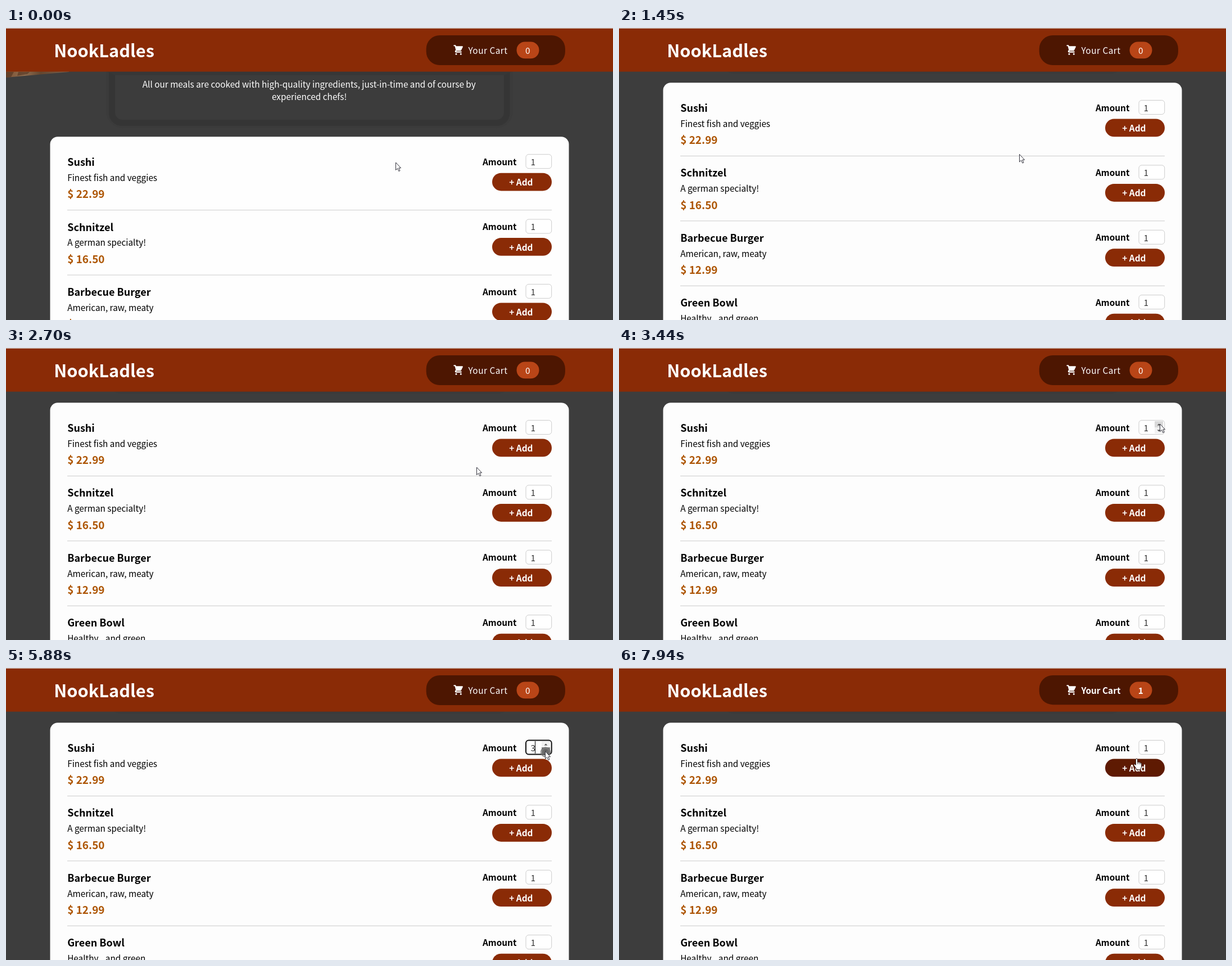
Animation of 1080x519 px, one loop 8 s. Source, as an HTML page:

```html
<!DOCTYPE html>
<html lang="en">
<head>
<meta charset="utf-8">
<title>NookLadles</title>
<style>
  html, body { margin: 0; width: 100%; height: 100%; overflow: hidden; background: #3d3d3d; }
  svg { display: block; width: 100%; height: 100%; }
  text { font: 400 15.32px "Noto Sans CJK JP", "Noto Sans CJK SC", "Noto Sans CJK", "Noto Sans JP", sans-serif; white-space: pre; }
  .title { font-size: 30.77px; font-weight: 700; fill: #fff; }
  .name { font-size: 18px; font-weight: 700; }
  .price { font-size: 18.95px; font-weight: 700; fill: #ad5502; }
  .label { font-size: 15.385px; font-weight: 700; }
  .value { font-weight: 300; fill: #333; }
  .light { fill: #fff; }
  .bold { font-size: 15.385px; font-weight: 700; fill: #fff; }
  .medium { font-size: 15.385px; font-weight: 500; fill: #fff; letter-spacing: .5px; }
  .mid { text-anchor: middle; }
</style>
</head>
<body>
<svg viewBox="0 0 1080 519" preserveAspectRatio="none">
  <defs>
    <linearGradient id="wood">
      <stop offset="0" stop-color="#7d5335"/>
      <stop offset=".3" stop-color="#8f6d50"/>
      <stop offset=".55" stop-color="#64462f"/>
      <stop offset="1" stop-color="#7d6350"/>
    </linearGradient>
  </defs>
  <rect width="1080" height="519" fill="#3d3d3d"/>
  <g id="page">
    <g transform="translate(0 -96.15)">
      <path d="M0 60H112V78L0 88Z" fill="url(#wood)"/>
      <path d="M0 78h14l-5 9-9 1zM22 78h20l-4 4-18 3z" fill="#50311f" opacity=".6"/>
      <rect x="178" y="-60" width="724" height="238" rx="30" fill="#3b3b3b"/>
      <rect x="183" y="-60" width="713.5" height="234" rx="23" fill="#353535"/>
      <rect x="194" y="-40" width="692" height="203" rx="13" fill="#3c3c3c"/>
      <path d="M176 76H904Q896 79 886 84H194Q184 79 176 76Z" fill="#373737"/>
      <text class="light mid" x="539.3" y="105.7">All our meals are cooked with high-quality ingredients, just-in-time and of course by</text>
      <text class="light mid" x="539.7" y="127.7">experienced chefs!</text>
    </g>
    <rect id="card" x="78.5" y="97.2" width="923" height="700" rx="13.5"/>
    <g id="list"></g>
  </g>
  <rect width="1080" height="77.6" fill="#8a2b06"/>
  <rect width="1080" height="1" fill="#cfc4bf"/>
  <text class="title" x="85.2" y="52">NookLadles</text>
  <rect id="cart" x="747.7" y="13" width="247.2" height="53" rx="24" fill="#4d1601"/>
  <path transform="translate(794.2 29.1) scale(1.04)" fill="#fff" d="M3 1a1 1 0 000 2h1.22l.305 1.222a.997.997 0 00.01.042l1.358 5.43-.893.892C3.74 11.846 4.632 14 6.414 14H15a1 1 0 000-2H6.414l1-1H14a1 1 0 00.894-.553l3-6A1 1 0 0017 3H6.28l-.31-1.243A1 1 0 005 1H3zM16 16.5a1.5 1.5 0 11-3 0 1.5 1.5 0 013 0zM6.5 18a1.5 1.5 0 100-3 1.5 1.5 0 000 3z"/>
  <text id="cartLabel" x="822.4">Your Cart</text>
  <rect x="908.5" y="24.5" width="40" height="29.8" rx="14.9" fill="#b94517"/>
  <text id="badge" x="928.4">0</text>
  <g id="ring">
    <circle r="8.5" fill="#777" fill-opacity=".5" stroke="#666" stroke-width="1"/>
    <circle r="6" fill="#555" fill-opacity=".45"/>
  </g>
  <g id="arrow">
    <path d="M.5 1V14.5L3.6 11.6 5.9 16.6 8 15.6 5.8 10.8H9.6Z" fill="#fff" stroke="#33333d" stroke-width="1" stroke-linejoin="round"/>
  </g>
  <g id="hand">
    <path d="M-1.6 1.6Q0-.8 1.6 1.6V7Q3.2 5.8 4.2 7.4 5.8 6.4 6.6 8 8.6 7.6 8.7 9.6V14Q8.4 17 7 18.5V20.3H-.5V18.6L-5 12.2Q-5.2 10-3.2 10.4L-1.6 12Z" fill="#fff" stroke="#2b1a16" stroke-width="1" stroke-linejoin="round"/>
    <path d="M1.6 7v3.4M4.2 7.6v3M6.6 8.2v2.6" stroke="#2b1a16" stroke-width=".8"/>
  </g>
</svg>
<script>
const LOOP = 8000, PITCH = 115.385, SCROLL = 96.15;
const $ = id => document.getElementById(id);
const set = (el, attrs) => { for (const k in attrs) el.setAttribute(k, attrs[k]); };
const show = (el, on) => set(el, { visibility: on ? 'visible' : 'hidden' });

const meals = [
  ['Sushi', 'Finest fish and veggies', '22.99'],
  ['Schnitzel', 'A german specialty!', '16.50'],
  ['Barbecue Burger', 'American, raw, meaty', '12.99'],
  ['Green Bowl', 'Healthy...and green...', '18.99']
];

$('list').innerHTML = meals.map(([name, info, price], i) => `
  <g transform="translate(0 ${i * PITCH})">
    <text class="name" x="109.2" y="149.1">${name}</text>
    <text x="109.2" y="175.8">${info}</text>
    <text class="price" x="109.2" y="206.3">$ ${price}</text>
    <rect x="109" y="227" width="862" height="1" fill="#ccc"/>
    <text class="label" x="848" y="147.6">Amount</text>
    <rect class="field" x="925" y="128.5" width="45.7" height="25" rx="5" fill="#fff" stroke="#ccc"/>
    ${i ? '' : `<g id="spinner">
      <rect id="up" x="953" y="130" width="15" height="11"/>
      <rect id="down" x="953" y="141" width="15" height="11"/>
      <path d="M957.5 137.5l3-3 3 3zM957.5 145.5l3 3 3-3z" fill="#505050"/>
    </g>
    <rect id="caret" x="941" y="130" width="1" height="22"/>`}
    <text class="value" x="933.4" y="147.8">1</text>
    <rect class="add" x="865" y="161.5" width="106" height="31.8" rx="15.9" fill="#8a2b06"/>
    <text class="bold" x="895.3" y="184">+ Add</text>
  </g>`).join('');

const field = document.querySelector('.field');
const value = document.querySelector('.value');
const addButton = document.querySelector('.add');

// spin: n = visible, u/d = hovered half, U/D = pressed half
const start = { x: 693, y: 238, scroll: SCROLL, amount: 1, spin: '', hover: 0, focus: 0, caret: 0, ring: 0, count: 0 };

// Each step: time, pointer x, pointer y, changed state
const steps = [
  [150, 702, 231],
  [380, 712, 223.5],
  [1450, 712, 223.5, { scroll: 0 }],
  [1570, 720, 219],
  [1770, 829, 188],
  [1910, 856, 182],
  [2060, 857, 182],
  [2220, 854, 187],
  [2340, 848, 196],
  [2460, 842, 204],
  [2580, 839, 209],
  [2700, 837, 211],
  [2820, 893, 176, { hover: 1 }],
  [2940, 938, 162],
  [3060, 948, 161],
  [3180, 953, 144, { hover: 0, spin: 'd' }],
  [3300, 957, 136, { spin: 'u' }],
  [3440, 962, 134],
  [3560, 965, 133],
  [4120, 965, 133, { focus: 1, caret: 1, amount: 2 }],
  [4410, 965, 133, { amount: 3, spin: 'U' }],
  [4560, 965, 133, { spin: 'u' }],
  [4810, 965, 133, { amount: 4, spin: 'U', ring: 1 }],
  [4960, 965, 133, { spin: 'u', ring: 0 }],
  [5390, 965, 133, { caret: 0 }],
  [5640, 962, 141, { spin: 'd' }],
  [5760, 959, 147],
  [5880, 959, 147, { amount: 3, caret: 1, spin: 'D', ring: 1 }],
  [6000, 959, 147, { spin: 'd', ring: 0 }],
  [6140, 959, 147, { amount: 2, spin: 'D', ring: 1 }],
  [6260, 959, 147, { spin: 'd', ring: 0 }],
  [6510, 959, 147, { amount: 1 }],
  [6630, 954, 161, { spin: 'n', hover: 1 }],
  [6750, 947, 167],
  [6870, 942, 172],
  [7010, 938, 173, { caret: 0 }],
  [7130, 935, 173],
  [7250, 933, 173],
  [7530, 933, 173, { caret: 1 }],
  [7820, 921, 160.5, { focus: 0, caret: 0, spin: '', count: 1 }]
];

function stateAt(t) {
  const s = { ...start };
  for (const [at, x, y, change] of steps) {
    if (at > t) break;
    Object.assign(s, { x, y }, change);
  }
  return s;
}

const shade = (spin, key) => spin === key ? '#d9d9d9' : spin === key.toUpperCase() ? '#858585' : '#f2f2f2';

function draw(t) {
  const s = stateAt(t);
  set($('page'), { transform: `translate(0 ${s.scroll})` });
  set($('card'), { fill: s.scroll ? '#fefefe' : '#fdfdfd' });

  set(field, { stroke: s.focus ? '#101010' : '#ccc', 'stroke-width': s.focus ? 2 : 1 });
  value.textContent = s.amount;
  show($('caret'), s.caret);
  show($('spinner'), s.spin);
  set($('up'), { fill: shade(s.spin, 'u') });
  set($('down'), { fill: shade(s.spin, 'd') });
  set(addButton, { fill: s.hover ? '#5e1a02' : '#8a2b06' });

  const place = { transform: `translate(${s.x} ${s.y})` };
  set($('arrow'), place);
  set($('hand'), place);
  set($('ring'), { transform: `translate(${s.x + 1} ${s.y + 2.5})` });
  show($('arrow'), !s.hover);
  show($('hand'), s.hover);
  show($('ring'), s.ring);

  const weight = s.count ? 'bold' : 'medium', y = s.count ? 45.6 : 46.4;
  $('badge').textContent = s.count;
  set($('badge'), { class: `${weight} mid`, y });
  set($('cartLabel'), { class: weight, y });
  set($('cart'), { height: s.count ? 52.2 : 53 });
}

const begin = performance.now();
function tick() {
  draw((performance.now() - begin) % LOOP);
  requestAnimationFrame(tick);
}
tick();
</script>
</body>
</html>
```
